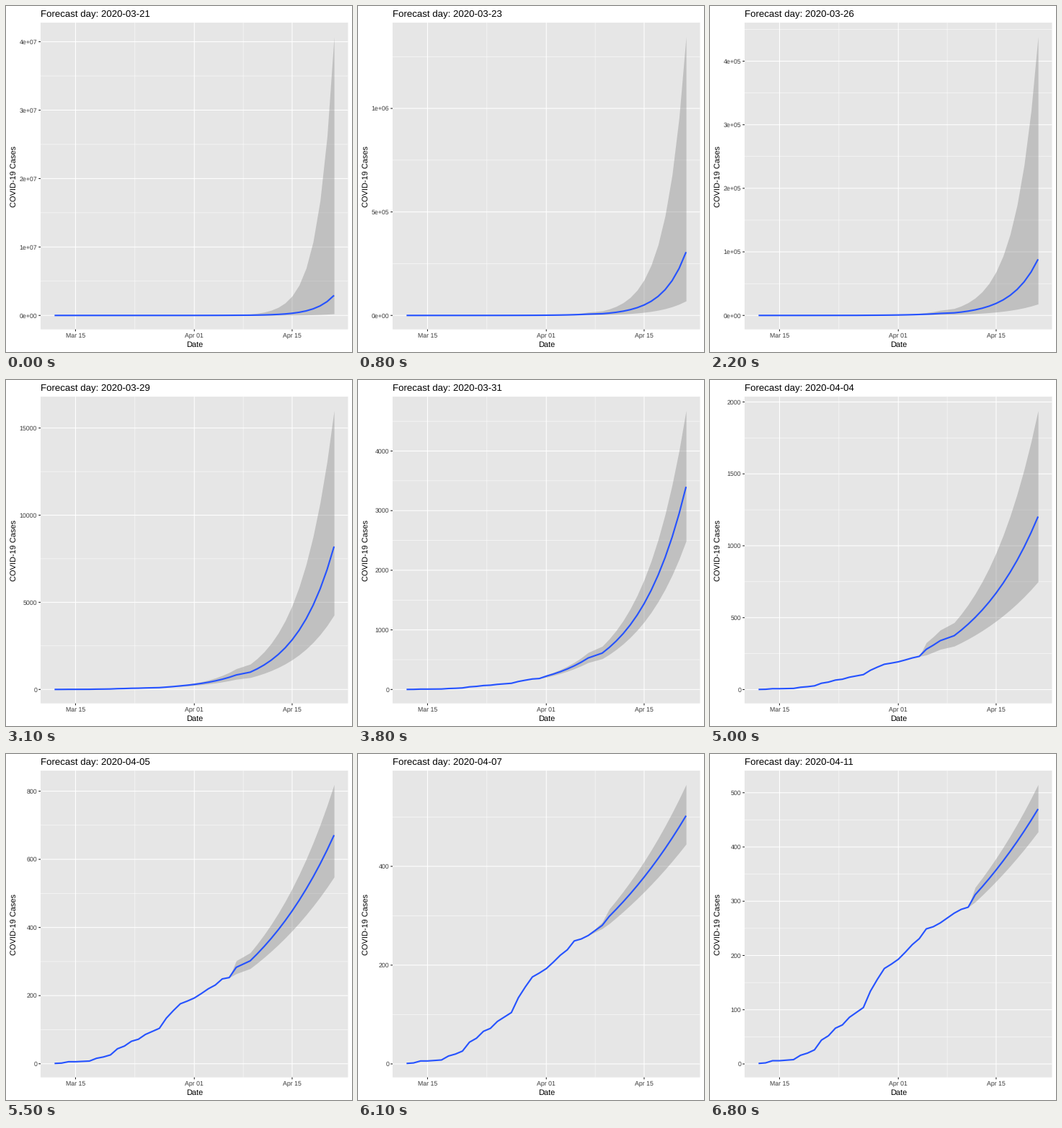
A matplotlib script that plays this animation: 480x480 px, repeating every 10000 ms.

```python
import math

import numpy as np
import matplotlib.pyplot as plt
from matplotlib.animation import FuncAnimation

plt.rcParams.update({
    "font.family": "Liberation Sans",
    "text.hinting": "none",
    "path.snap": False,
    "lines.solid_capstyle": "butt",
})

SIZE, DPI = 480, 80
PT = 72 / DPI  # points per pixel
LEFT, RIGHT, TOP, BOTTOM = 48.0, 474.5, 23.1, 448.6

PANEL, RIBBON, BLUE = "#e6e6e6", "#888888", "#2653ff"
TICK, LABEL = "#242424", "#3b3b3b"

# Days since Mar 12; there is no report for Apr 8
DAYS = np.array([d for d in range(41) if d != 27])
CASES = [1, 2, 6, 6, 7, 8, 16, 20, 26, 44, 52, 66, 72, 86, 95, 104, 134, 156,
         176, 184, 193, 206, 220, 231, 249, 253, 260, 278, 285, 289]

# Per forecast day: first predicted value, then mid, low and high on Apr 21
RUNS = [
    (60, 2.93e6, 2.4e5, 4.075e7),
    (75, 2.4e6, 1.8e5, 3.8e7),
    (92, 3.06e5, 7e4, 1.347e6),
    (100, 3.3e5, 6.5e4, 1.7e6),
    (150, 1.9e5, 3.8e4, 9.1e5),
    (215, 1.18e5, 2.3e4, 5.93e5),
    (200, 2.9e4, 8e3, 1.3e5),
    (185, 1.1e4, 5e3, 2.4e4),
    (195, 6800, 3900, 1.2e4),
    (210, 4800, 3200, 7200),
    (224, 3400, 2490, 4678),
    (232, 2800, 2000, 3950),
    (245, 2250, 1600, 3200),
    (262, 1700, 1150, 2500),
    (280, 1203, 750, 1940),
    (295, 822, 640, 1050),
    (271, 520, 456, 588.6),
    (283, 510, 450, 575),
    (300, 495, 440, 556),
    (307, 482, 434, 535),
    (312, 470, 428, 515),
]
APR_5 = 15  # this run already knows the Apr 6 count

# Frame at which each new forecast is fully shown
ENDS = list(range(4, 33, 4)) + list(range(35, 69, 3))


def curves(i):
    """Rows mid, low, high: known cases followed by exponential growth."""
    first, mid, low, high = RUNS[i]
    known = 10 + i + (i == APR_5)
    count = len(DAYS) - known
    spread = 0.1 + 3.3 / (count - 1)
    rows = []
    for last in (mid, low, high):
        start = first * (last / mid) ** spread
        rows.append(np.concatenate([CASES[:known],
                                    np.geomspace(start, last, count)]))
    return np.array(rows)


STATES = [curves(i) for i in range(len(RUNS))]


def day_name(i):
    if i <= 10:
        return f"2020-03-{21 + i}"
    day = i - 10
    return f"2020-04-{day + (day >= 8):02d}"


def progress(frame):
    """Current state and the fraction of the way to the next one."""
    for i, end in enumerate(ENDS):
        if frame < end:
            steps = 3 if i < 8 and i != 2 else 2
            return i, max(0, frame - end + steps) / steps
    return len(ENDS), 0


def find_breaks(lo, hi):
    """Extended Wilkinson breaks for a range that starts just below zero."""
    power = 10 ** math.floor(math.log10(hi))
    best, choice = -math.inf, None
    for i, q in enumerate((1, 5, 2, 2.5, 4, 3)):
        for scale in (power / 10, power):
            step = q * scale
            for k in range(2, 12):
                top = (k - 1) * step
                miss = (hi - top) ** 2 + lo ** 2
                cover = 1 - 0.5 * miss / (0.1 * (hi - lo)) ** 2
                ratio = (max(top, hi) - lo) / (4 * step)
                density = 2 - max(ratio, 1 / ratio)
                score = 0.25 * (1 - i / 5) + 0.2 * cover + 0.5 * density
                if score > best:
                    best, choice = score, (step, k)
    step, k = choice
    return step, [n * step for n in range(k) if n * step <= hi]


def format_breaks(values):
    """Fixed notation unless scientific is shorter."""
    fixed = [f"{v:.0f}" for v in values]
    for digits in range(4):
        sci = [f"{v:.{digits}e}" for v in values]
        if all(math.isclose(float(s), v, abs_tol=1e-9)
               for s, v in zip(sci, values)):
            break
    return sci if len(sci[-1]) < max(map(len, fixed)) else fixed


def px(day):
    return LEFT + (np.asarray(day) + 2) * (RIGHT - LEFT) / 44


fig = plt.figure(figsize=(SIZE / DPI, SIZE / DPI), dpi=DPI, facecolor="white")
ax = fig.add_axes([0, 0, 1, 1])
ax.set_xlim(0, SIZE)
ax.set_ylim(SIZE, 0)
ax.axis("off")


def line(xs, ys, color, width, z):
    return ax.plot(xs, ys, color=color, lw=width * PT, zorder=z)[0]


def text(x, y, s, size, color="black", ha="center", **kw):
    return ax.text(x, y, s, fontsize=size * PT, color=color, ha=ha,
                   va="baseline", **kw)


ax.fill([LEFT, RIGHT, RIGHT, LEFT], [TOP, TOP, BOTTOM, BOTTOM],
        color=PANEL, lw=0, zorder=0)
for day in (11.5, 27):
    line([px(day)] * 2, [TOP, BOTTOM], "white", 0.53, 1)
for day, name in ((3, "Mar 15"), (20, "Apr 01"), (34, "Apr 15")):
    x = px(day)
    line([x, x], [TOP, BOTTOM], "white", 1.07, 2)
    line([x, x], [BOTTOM, BOTTOM + 2.75], TICK, 1.07, 2)
    text(x, 460, name, 8.8, LABEL)
text((LEFT + RIGHT) / 2, 473, "Date", 11)
text(13.5, 236, "COVID-19 Cases", 11, rotation=90, rotation_mode="anchor")
title = text(LEFT, 15, "", 13.2, ha="left")

moving = []


def draw(frame):
    while moving:
        moving.pop().remove()

    i, t = progress(frame)
    data = STATES[i]
    if t:
        data = (1 - t) * data + t * STATES[i + 1]
    title.set_text(f"Forecast day: {day_name(i + (t > 0.5))}")

    peak = data.max()
    pad = 0.05 * (peak - 1)
    lo, hi = 1 - pad, peak + pad

    def py(v):
        return BOTTOM - (v - lo) / (hi - lo) * (BOTTOM - TOP)

    step, values = find_breaks(lo, hi)
    for n in range(-1, len(values) + 1):
        v = (n + 0.5) * step
        if lo <= v <= hi:
            moving.append(line([LEFT, RIGHT], [py(v)] * 2, "white", 0.53, 1))
    for v, name in zip(values, format_breaks(values)):
        y = py(v)
        moving.append(line([LEFT, RIGHT], [y, y], "white", 1.07, 2))
        moving.append(line([LEFT - 2.75, LEFT], [y, y], TICK, 1.07, 2))
        moving.append(text(43.05, y + 3.15, name, 8.8, LABEL, "right"))

    mid, low, high = py(data)
    xs = px(DAYS)
    moving.append(ax.fill_between(xs, low, high, color=RIBBON, alpha=0.4,
                                  lw=0, zorder=3))
    moving.append(line(xs, mid, BLUE, 2.13, 4))
    return moving


anim = FuncAnimation(fig, draw, frames=100, interval=100,
                     init_func=lambda: draw(0), repeat=True, blit=False)
plt.show()
```
